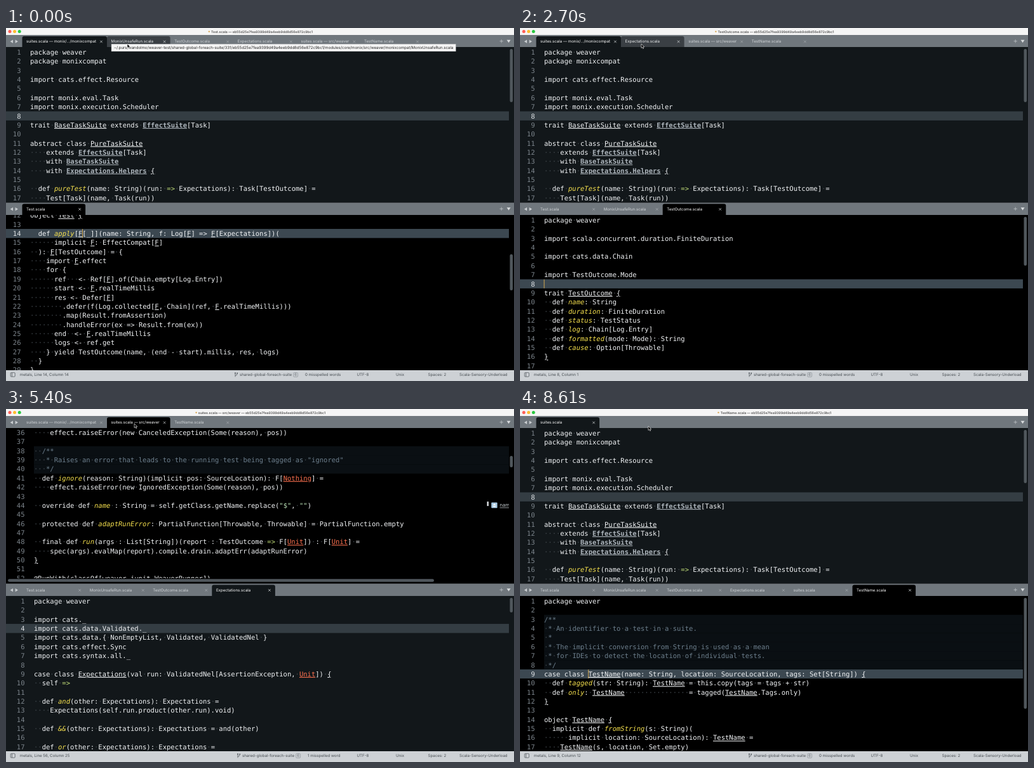
Write an HTML page that moves like this. It is 800 by 557 pixels and loops after 8.64 s.

```html
<!DOCTYPE html>
<html lang="en">
<head>
<meta charset="utf-8">
<title>Editor tabs</title>
<style>
  html, body { margin: 0; width: 100%; height: 100%; overflow: hidden; background: #000; }
  svg { display: block; width: 100%; height: 100%; }
  text { white-space: pre; text-rendering: geometricPrecision; }
  .ui { font: 6.15px Inter, sans-serif; }
  .title { font: 600 5.22px Inter, sans-serif; fill: #555; text-anchor: middle; }
  .tip { font: 6.09px Inter, sans-serif; fill: #222; }
  .lens { font: 7.6px Inter, sans-serif; fill: #c3c9ce; }
  .code { font: 10.53px "DejaVu Sans Mono", monospace; fill: #f2f4f6; }
  .num { fill: #7b838a; text-anchor: end; }
  .now { fill: #dfe3e6; }
  .dot { fill: #42494f; }
  .fn { fill: #f5e04e; font-style: italic; }
  .base { fill: #adb5bc; font-weight: bold; }
  .red { fill: #ff7250; }
  .type { fill: #d9b978; }
  .val { fill: #8f8fd6; }
  .arrow { fill: #c3e07a; }
  .str { fill: #b9dfb4; }
  .note { fill: #6d7f8d; }
  .name, .base, .red, .mark, .brace { text-decoration: underline; text-decoration-thickness: .55px; text-underline-offset: 2px; }
</style>
</head>
<body>
<svg viewBox="0 0 800 557" preserveAspectRatio="none">
  <defs>
    <clipPath id="clip0"><path d="M0 30H792V275H0Z"/></clipPath>
    <clipPath id="clip1"><path d="M0 295H792V540H0Z"/></clipPath>
    <clipPath id="clip0h"><path d="M0 30H792V267H0Z"/></clipPath>
    <clipPath id="clip1h"><path d="M0 295H792V531.5H0Z"/></clipPath>
  </defs>
  <g id="stage"></g>
  <circle id="ring" r="10" fill="#1c2f55" fill-opacity=".35" stroke="#3f62a8" stroke-width="1.2"/>
  <path id="pointer" d="M0 0V6.6L1.6 5.2L2.7 7.6L3.8 7.1L2.7 4.8H4.8Z" fill="#000" stroke="#fff" stroke-width=".6"/>
</svg>
<script>
const LOOP = 8640, CH = 6.34, LINE = 14.36;
const HASH = 'eb55d25e7fea9399d49a4eeb9dd8d56e872c9bc1';
const ROOT = `~/.purs/wandolmo/weaver-test/shared-global-foreach-suite/331/${HASH}/modules/core/`;

// pos: line and column of the caret; bar: scrollbar offset and length; shift: scroll remainder
const files = {
  base: { name: 'suites.scala', pos: [8, 1], bar: [3, 84], text: `package weaver
package monixcompat

import cats.effect.Resource

import monix.eval.Task
import monix.execution.Scheduler

trait BaseTaskSuite extends EffectSuite[Task]

abstract class PureTaskSuite
    extends EffectSuite[Task]
    with BaseTaskSuite
    with Expectations.Helpers {

  def pureTest(name: String)(run: => Expectations): Task[TestOutcome] =
    Test[Task](name, Task(run))` },

  test: { name: 'Test.scala', pos: [14, 14], bar: [62, 57], first: 12, shift: -7.7, mark: 'F', text: `object Test {

  def apply[F[_]](name: String, f: Log[F] => F[Expectations])(
      implicit F: EffectCompat[F]
  ): F[TestOutcome] = {
    import F.effect
    for {
      ref   <- Ref[F].of(Chain.empty[Log.Entry])
      start <- F.realTimeMillis
      res <- Defer[F]
        .defer(f(Log.collected[F, Chain](ref, F.realTimeMillis)))
        .map(Result.fromAssertion)
        .handleError(ex => Result.from(ex))
      end  <- F.realTimeMillis
      logs <- ref.get
    } yield TestOutcome(name, (end - start).millis, res, logs)
  }
}` },

  monix: { name: 'MonixUnsafeRun.scala', dir: 'monix/src/weaver/monixcompat/', pos: [9, 8], bar: [3, 123], text: `package weaver
package monixcompat

import cats.effect.{ ContextShift, Timer }

import monix.eval.Task
import monix.execution.{ Cancelable, Scheduler }

object MonixUnsafeRun extends UnsafeRun[Task] {

  type CancelToken = Cancelable

  implicit val scheduler: Scheduler = PlatformCompat.defaultScheduler

  override implicit val contextShift: ContextShift[Task] =
    Task.contextShift(scheduler)
  override implicit val timer: Timer[Task] =` },

  outcome: { name: 'TestOutcome.scala', pos: [8, 1], bar: [3, 77], text: `package weaver

import scala.concurrent.duration.FiniteDuration

import cats.data.Chain

import TestOutcome.Mode

trait TestOutcome {
  def name: String
  def duration: FiniteDuration
  def status: TestStatus
  def log: Chain[Log.Entry]
  def formatted(mode: Mode): String
  def cause: Option[Throwable]
}
` },

  expect: { name: 'Expectations.scala', pos: [4, 28], bar: [3, 23], left: 44, typo: true, text: `package weaver

import cats._
import cats.data.Validated._
import cats.data.{ NonEmptyList, Validated, ValidatedNel }
import cats.effect.Sync
import cats.syntax.all._

case class Expectations(val run: ValidatedNel[AssertionException, Unit]) {
  self =>

  def and(other: Expectations): Expectations =
    Expectations(self.run.product(other.run).void)

  def &&(other: Expectations): Expectations = and(other)

  def or(other: Expectations): Expectations =` },

  suites: { name: 'suites.scala', pos: [56, 25], bar: [44, 18], left: 44, first: 36, shift: -1, wide: true, typo: true, text: `    effect.raiseError(new CanceledException(Some(reason), pos))

  /**
   * Raises an error that leads to the running test being tagged as "ignored"
   */
  def ignore(reason: String)(implicit pos: SourceLocation): F[Nothing] =
    effect.raiseError(new IgnoredException(Some(reason), pos))

  override def name : String = self.getClass.getName.replace("$", "")

  protected def adaptRunError: PartialFunction[Throwable, Throwable] = PartialFunction.empty

  final def run(args : List[String])(report : TestOutcome => F[Unit]) : F[Unit] =
    spec(args).evalMap(report).compile.drain.adaptErr(adaptRunError)
}

@RunWith(classOf[weaver.junit.WeaverRunner])` },

  testName: { name: 'TestName.scala', pos: [9, 12], bar: [3, 175], mark: 'TestName', text: `package weaver

/**
 * An identifier to a test in a suite.
 *
 * The implicit conversion from String is used as a mean
 * for IDEs to detect the location of individual tests.
 */
case class TestName(name: String, location: SourceLocation, tags: Set[String]) {
  def tagged(str: String): TestName = this.copy(tags = tags + str)
  def only: TestName                = tagged(TestName.Tags.only)
}

object TestName {
  implicit def fromString(s: String)(
      implicit location: SourceLocation): TestName =
    TestName(s, location, Set.empty)` }
};

const queue = ['monix', 'outcome', 'expect', 'suites', 'testName'];

// at: start time; moved: tabs already in the lower pane; open: the next tab is shown above
const scenes = [
  { at: 0, moved: 0, tip: true },
  { at: 450, moved: 0, open: true },
  { at: 1050, moved: 1 },
  { at: 1650, moved: 1, tip: true },
  { at: 2220, moved: 1, open: true },
  { at: 2700, moved: 2 },
  { at: 3120, moved: 2, tip: true },
  { at: 4470, moved: 2, open: true },
  { at: 4830, moved: 3 },
  { at: 5100, moved: 3, open: true },
  { at: 6000, moved: 4 },
  { at: 6600, moved: 4, tip: true },
  { at: 7350, moved: 4, open: true },
  { at: 7950, moved: 5 }
];

const track = [
  [0, 191, 25], [2700, 191, 25], [3000, 202, 21], [4300, 202, 21], [4470, 202, 23],
  [6000, 202, 23], [6500, 197, 23], [7950, 197, 23], [8300, 202, 27], [LOOP, 202, 27]
];

const $ = id => document.getElementById(id);
const esc = s => s.replace(/&/g, '&amp;').replace(/</g, '&lt;');
const rect = (x, y, w, h, fill, r = 0) => `<rect x="${x}" y="${y}" width="${w}" height="${h}" fill="${fill}" rx="${r}"/>`;
const text = (x, y, s, cls = 'ui', fill = '') => `<text x="${x}" y="${y}" class="${cls}"${fill && ` fill="${fill}"`}>${s}</text>`;
const path = (d, fill, stroke = 'none', w = .7) => `<path d="${d}" fill="${fill}" stroke="${stroke}" stroke-width="${w}"/>`;
const span = (cls, s) => `<tspan class="${cls}">${s}</tspan>`;

const comment = /^\s*(\/\*\*|\*)/;
const rules = [
  ['dot', ' +'],
  ['fn', '(?<=\\bdef )[\\w&]+'],
  ['name', '(?<=\\b(?:class|trait|object) )\\w+'],
  ['base', '(?<=\\b(?:extends|with) )[\\w.]+'],
  ['red', '\\b(?:Unit|Nothing)\\b'],
  ['type', '(?<=\\btype )\\w+'],
  ['val', '(?<=implicit val )\\w+'],
  ['arrow', '(?<=self |run: |Outcome )=>'],
  ['str', '"[^"]*"'],
  ['brace', '(?<=[^r=] )\\{$|^\\}']
];

function paint(line, mark) {
  const dots = s => s.replace(/ +/g, m => span('dot', '·'.repeat(m.length)));
  if (comment.test(line)) return span('note', dots(line));
  const all = mark ? [...rules, ['mark', `\\b${mark}\\b`]] : rules;
  const re = new RegExp(all.map(([k, r]) => `(?<${k}>${r})`).join('|'), 'g');
  let out = '', last = 0;
  for (const m of line.matchAll(re)) {
    const kind = Object.keys(m.groups).find(k => m.groups[k] !== undefined);
    out += esc(line.slice(last, m.index));
    out += kind === 'dot' ? dots(m[0]) : span(kind, esc(m[0]));
    last = m.index + m[0].length;
  }
  return out + esc(line.slice(last));
}

function code(file, top, pane, focused) {
  const { first = 1, shift = 0, left = 38, pos, wide, bar, mark } = file;
  const mid = n => top + 8.2 + shift + (n - first) * LINE;
  const lines = file.text.split('\n');
  const on = pos[0] >= first && pos[0] < first + lines.length;
  let out = '';
  if (on) out += rect(0, mid(pos[0]) - 7.2, 792, LINE, focused ? '#3c4851' : '#343d43');
  lines.forEach((line, i) => {
    const n = first + i, y = mid(n);
    if (comment.test(line)) out += rect(left, y - 7.2, 792 - left, LINE + .1, focused ? '#0a0f13' : '#171d21');
    out += text(left - 14.5, y + 3.8, n, on && n === pos[0] ? 'code num now' : 'code num');
    if (line) out += text(left, y + 3.8, paint(line, mark), 'code');
  });
  if (focused && on) out += rect(left + (pos[1] - 1) * CH - .4, mid(pos[0]) - 7, .9, 14, '#e6b450');
  if (wide) {
    const y = mid(44);
    out += rect(757.5, y - 6, 2.5, 7, '#d8dcdf') + rect(764.3, y - 4.5, 9.4, 8.6, '#a9cbe4', 1)
      + path(`M769 ${y - 3.2}l2.5 3h-5zM767 ${y + 1}h4v1.5h-4z`, '#fff')
      + text(777.5, y + 2.4, span('mark', 'name'), 'lens');
  }
  return `<g clip-path="url(#clip${pane}${wide ? 'h' : ''})">${out}</g>`
    + rect(793.5, top + bar[0], 4.6, bar[1], '#50575c', 2.3)
    + (wide ? rect(3, top + 238.2, 671, 4.6, '#50575d', 2.3) : '');
}

const label = (id, split) => files[id].name + (!split ? '' : id === 'base' ? ' — monix/.../monixcompat' : id === 'suites' ? ' — src/weaver' : '');

function pane(index, tabs, active, focused, split, hover) {
  const top = index ? 275.5 : 11, body = index ? 295 : 30;
  const bg = focused ? '#000' : '#12171a';
  let x = 25.5;
  let out = rect(0, top, 800, body - top, '#70777d') + rect(0, body, 800, 245, bg);
  const y = top + 10.3;
  out += path(`M11 ${y - 2.7}v5.4l-4.4-2.7zM14.6 ${y - 2.7}v5.4l4.4-2.7z`, '#c9cdd0')
    + path(`M777.5 ${y - .5}h5.4M780.2 ${y - 3.2}v5.4`, 'none', '#c9cdd0')
    + path(`M788.6 ${y - 2.6}h6l-3 4.6z`, '#d9dcde');
  tabs.forEach((id, i) => {
    const w = split && id === 'base' ? 133.5 : 99.6;
    const lit = id === active, hot = i === hover && !lit, y0 = top + 2;
    if (lit || hot) out += path(`M${x} ${body}V${y0 + 3}q0-3 3-3H${x + w - 3}q3 0 3 3V${body}z`, lit ? bg : '#3a3f44');
    const ink = lit ? '#fff' : hot ? '#eef0f1' : '#d0d4d7', c = x + w - 9;
    out += text(x + 6.6, top + 12.4, label(id, split), 'ui', ink)
      + path(`M${c - 1.8} ${y - 1.6}l3.6 3.6m0-3.6l-3.6 3.6`, 'none', lit || hot ? '#dfe2e4' : '#a9aeb2');
    x += w;
  });
  return out + code(files[active], body, index, focused);
}

function status({ pos, typo }) {
  const dx = typo ? 4 : 0, y = 549.2, ink = '#474d52';
  return rect(0, 540, 800, 17, '#cdd1d5')
    + `<rect x="7.2" y="543.8" width="7" height="6.4" rx="1" fill="none" stroke="${ink}" stroke-width=".7"/>`
    + path('M9.4 544v6', 'none', ink)
    + text(21.8, y, `metals, Line ${pos[0]}, Column ${pos[1]}`, 'ui', ink)
    + path(`M${361 + dx} 544v6.4m0-2q3.2 0 3.2-3.4`, 'none', ink)
    + `<circle cx="${361 + dx}" cy="544.4" r=".9" fill="${ink}"/><circle cx="${364.2 + dx}" cy="544.6" r=".9" fill="${ink}"/>`
    + text(368 + dx, y, 'shared-global-foreach-suite', 'ui', ink)
    + `<rect x="${452.6 + dx}" y="543.8" width="7" height="6.8" rx="1.6" fill="none" stroke="#80868b" stroke-width=".6"/>`
    + text(454.3 + dx, y, '6', 'ui', '#6d7378')
    + text(471 + dx, y, typo ? '1 misspelled word' : '0 misspelled words', 'ui', ink)
    + text(552.5, y, 'UTF-8', 'ui', ink) + text(614, y, 'Unix', 'ui', ink)
    + text(664.5, y, 'Spaces: 2', 'ui', ink) + text(714, y, 'Scala-Sensory-Underload', 'ui', ink);
}

function draw({ moved, open, tip }) {
  const split = moved < 4, next = queue[moved];
  const upper = open ? next : 'base';
  const lower = moved ? queue[moved - 1] : 'test';
  const focus = open ? upper : lower;
  let out = pane(0, ['base', ...queue.slice(moved)], upper, open, split, 1)
    + pane(1, ['test', ...queue.slice(0, moved)], lower, !open, split, -1)
    + status(files[focus])
    + rect(0, 0, 800, 11, '#f5f5f5');
  ['#fe5f57', '#febc2e', '#28c840'].forEach((c, i) => out += `<circle cx="${6 + i * 7.6}" cy="5.6" r="2.5" fill="${c}"/>`);
  out += `<text id="title" class="title" x="403" y="7.5">${label(focus, split)} — ${HASH}</text>`
    + `<circle id="icon" cy="5.6" r="1.2" fill="#d9a650"/>`;
  if (tip) {
    const x = split ? 166 : 132, { dir = 'src/weaver/', name } = files[next];
    out += `<rect id="box" x="${x}" y="25.3" height="11.6" fill="#f5f5f5" stroke="#a5a9ac" stroke-width=".4"/>`
      + `<text id="tip" class="tip" x="${x + 4}" y="33.2">${ROOT + dir + name}</text>`;
  }
  $('stage').innerHTML = out;
  $('icon').setAttribute('cx', 403 - $('title').getComputedTextLength() / 2 - 3.2);
  if (tip) $('box').setAttribute('width', $('tip').getComputedTextLength() + 8);
}

function pointerAt(t) {
  const i = track.findIndex(k => k[0] > t);
  const [a, b] = [track[i - 1], track[i]];
  const u = (t - a[0]) / (b[0] - a[0]), e = u * u * (3 - 2 * u);
  return [1, 2].map(k => a[k] + (b[k] - a[k]) * e);
}

let shown;
function render(t) {
  const scene = scenes.findLast(s => s.at <= t);
  if (scene !== shown) draw(shown = scene);
  const [x, y] = pointerAt(t);
  $('pointer').setAttribute('transform', `translate(${x} ${y})`);
  const ring = $('ring');
  ring.setAttribute('cx', x);
  ring.setAttribute('cy', y);
  ring.setAttribute('opacity', scene.open ? Math.max(0, 1 - (t - scene.at) / 240) : 0);
}

const start = performance.now();
function tick() {
  render((performance.now() - start) % LOOP);
  requestAnimationFrame(tick);
}
tick();
</script>
</body>
</html>
```
